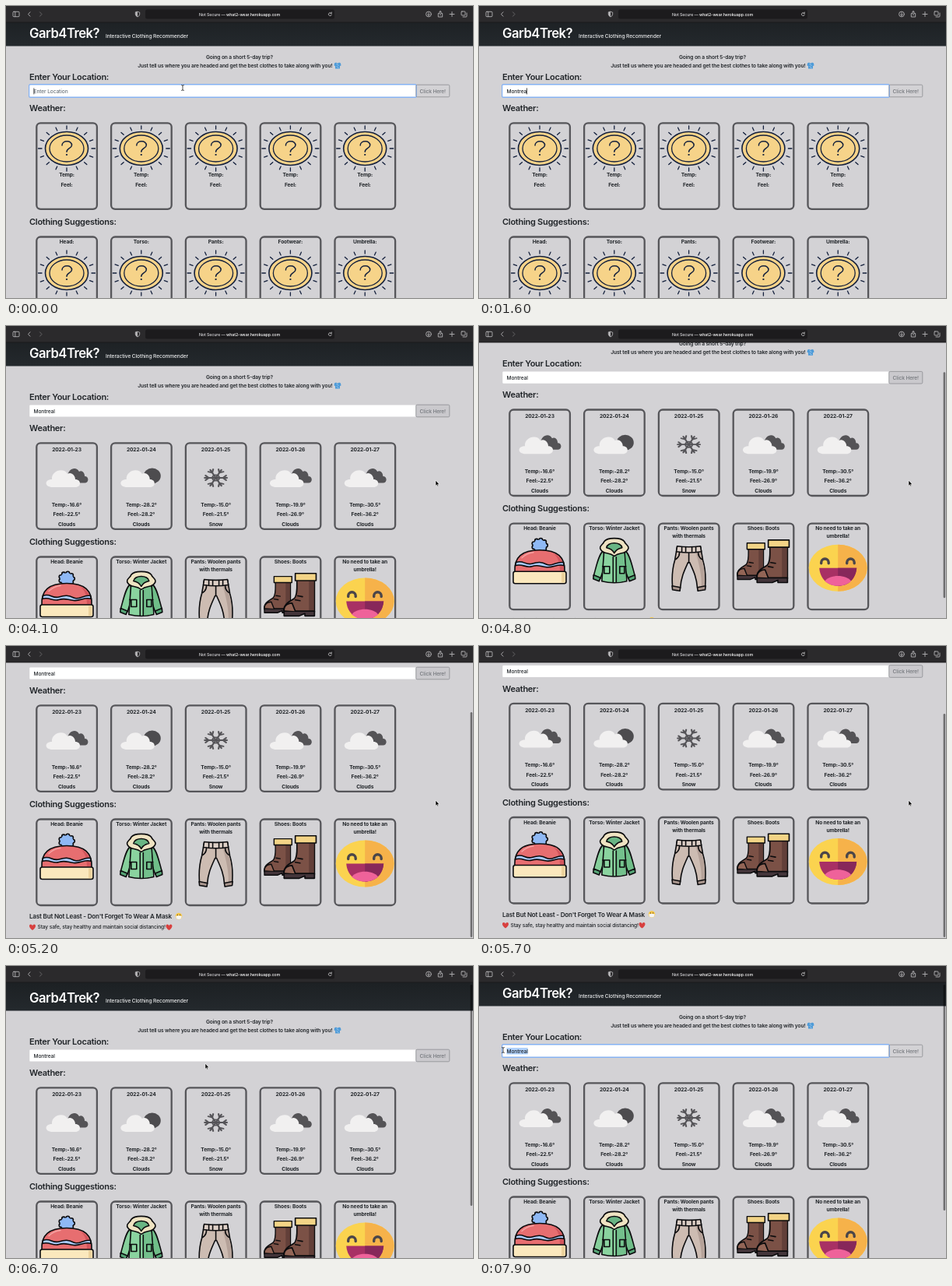
Write an HTML page that moves like this. It is 600 px wide and 375 px high and loops after 8 s.

```html
<!DOCTYPE html>
<html lang="en">
<head>
<meta charset="utf-8">
<title>Clothing Recommender</title>
<style>
html, body { margin: 0; width: 100%; height: 100%; overflow: hidden; background: #d3d2d5; }
svg { display: block; width: 600px; height: 375px; }
text { font: 500 6.67px Inter, "Open Sans", sans-serif; letter-spacing: -.02em; fill: #212529; white-space: pre; }
.mid { text-anchor: middle; }
.med { font-weight: 600; }
.bold { font-weight: 700; text-anchor: middle; }
.head { font-size: 11px; font-weight: 600; letter-spacing: -.025em; }
.line { fill: none; stroke-linecap: round; stroke-linejoin: round; }
.ink { stroke: #0b0b0d; stroke-width: 1.6; stroke-linejoin: round; stroke-linecap: round; }
</style>
</head>
<body>
<svg id="stage" viewBox="0 0 600 375"></svg>
<script>
const text = (x, y, s, cls = '', extra = '') => `<text x="${x}" y="${y}" class="${cls}" ${extra}>${s}</text>`;
const path = (d, fill = 'none', cls = 'ink') => `<path d="${d}" fill="${fill}" class="${cls}"/>`;
const ellipse = (x, y, rx, ry, fill, extra = '') =>
  `<ellipse cx="${x}" cy="${y}" rx="${rx}" ry="${ry}" fill="${fill}" ${extra}/>`;
const at = (x, y, s, scale = 1) => `<g transform="translate(${x} ${y}) scale(${scale})">${s}</g>`;
const range = n => [...Array(n).keys()];
const columns = range(5).map(i => 78 + i * 95.8);

// Placeholder icon: a sun-like coin with a question mark
const rays = range(16).map(i => {
  const a = i * Math.PI / 8, c = Math.cos(a), s = Math.sin(a);
  return `M${c * 32} ${s * 25}L${c * 36.5} ${s * 29}`;
}).join('');
const coin = `<g class="line" stroke="#14203c">
  <path d="${rays}" stroke-width="1.3"/>
  ${ellipse(0, 0, 27.5, 21.5, '#f6d389', 'stroke-width="1.6"')}
  ${ellipse(0, 0, 22, 17, '#f6d389', 'stroke-width="1.3"')}
  <path d="M-6 -4C-6 -11 7 -11 6.5 -4C6.3 0 0 -.5 0 4.2" stroke-width="1.5"/>
  ${ellipse(0, 8, 1.2, 1, '#14203c', 'stroke="none"')}</g>`;

// Weather icons
const cloudShape = 'M-17 10C-28 10 -28 0 -18 0C-19 -11 -3 -16 2 -7C7 -10 12 -5 12 0C20 0 20 10 12 10Z';
const whiteCloud = at(-1, 2, path(cloudShape, '#f1f0f0', ''));
const cloudy = at(14.5, -2, `<g transform="scale(.72 .85)">${path(cloudShape, '#545356', '')}</g>`) + whiteCloud;
const moonCloud = ellipse(14, -2.5, 11, 10, '#4d4c4f') + whiteCloud;
const snow = '<g class="line" stroke="#555458" stroke-width="1.9" transform="scale(1.15 .95)">' + range(6).map(i =>
  `<path transform="rotate(${i * 60 + 30})" d="M0 0V-12.5M-3.2 -11.5L0 -8L3.2 -11.5"/>`).join('') +
  ellipse(0, 0, 3.8, 3.8, 'none') + '</g>';

// Clothing icons
const beanie =
  range(9).map(i => `<circle cx="${8 * Math.cos(i * .698)}" cy="${-19 + 7 * Math.sin(i * .698)}" r="2.3" fill="#8fb9f5" class="ink"/>`).join('') +
  ellipse(0, -19, 8.3, 7.3, '#8fb9f5') +
  path('M-32 15C-33 -4 -23 -13 0 -13S33 -4 32 15Z', '#e76e70') +
  path('M17 -9C28 -4 31 4 31 14H26C26 4 24 -4 17 -9Z', '#d2555c', '') +
  path('M-30.5 3C-22 -1 -18 7 -10 4.5S2 2 9 5.5S22 1 30.5 3L31.5 7C23 4 18 10 9 9S-2 5.5 -10 8S-22 4 -31.5 7Z', '#a9cbfb') +
  path('M-23 -3Q-17 -9 -8 -10', 'none', 'line" stroke="#f4a3a2" stroke-width="1.5') +
  `<rect x="-34" y="14.5" width="68" height="15.5" rx="2.5" fill="#fbe8bd" class="ink"/>` +
  path('M28 16H32.5V28.5H28Z', '#ecd29d', '');
const jacket =
  path('M-14 -12C-20 -8 -23 8 -26.5 20L-18 24L-11 4Z', '#86cf9b') +
  path('M14 -12C20 -8 23 8 26.5 20L18 24L11 4Z', '#6fbd88') +
  path('M-26.5 19L-18 22.5L-19.5 27L-27 24Z', '#55a375') +
  path('M26.5 19L18 22.5L19.5 27L27 24Z', '#55a375') +
  path('M-13 -13H13L16 27Q0 31 -16 27Z', '#8ad39f') +
  path('M3 -12H12L15 26Q9 28 3 28Z', '#73c08c', '') +
  path('M-17 -13C-21 -18 -14 -20 -13 -24C-9 -29.5 9 -29.5 13 -24C14 -20 21 -18 17 -13C13 -7 7 -11 0 -5C-7 -11 -13 -7 -17 -13Z', '#efe3c2') +
  path('M-10 -16C-9 -24 9 -24 10 -16C5 -15 2 -13 0 -9C-2 -13 -5 -15 -10 -16Z', '#69b584') +
  path('M-1.5 -4V28M2.5 -4V28M-15 8H-6M15 8H7M-13 8V17H-6V8M13 8V17H7V8');
const pants =
  path('M-15 -17H15L18 0C21 10 22 22 21 34L11 36C10 22 6 14 1 3H-1C-6 14 -10 22 -11 36L-21 34C-22 22 -21 10 -18 0Z', '#cdbcb2') +
  path('M9 -10H15L17 0C20 10 21 22 20 33L16 34C17 20 13 5 9 -10Z', '#b5a299', '') +
  path('M-15 -18Q0 -16 15 -18L16 -11Q0 -8.5 -16 -11Z', '#ddcfc6') +
  path('M-21.5 33L-11 35L-11.5 39.5L-21 38ZM21.5 33L11 35L11.5 39.5L21 38Z', '#a8958d') +
  path('M0 -9V3M-12 -10Q-12 -4 -17 -1M12 -10Q12 -4 17 -1M-9 -17V-11M-4 -17V-11M4 -17V-11M9 -17V-11');
const boot =
  path('M-6 -18H16V22H-22C-24 12 -14 9 -9 5C-5 0 -6 -9 -6 -18Z', '#7b5146') +
  path('M9 -17H15V21H9Z', '#623f39', '') +
  path('M-22 21H16V27H4V24L-3 27H-22Z', '#43353a') +
  path('M-22 20C-22 13 -16 11 -12 11L-8 21', '#936556') +
  path('M-8 -26H18V-17H-8Z', '#f3d486') +
  path('M-5 2L1 3M-8 7L-2 8');
const boots = at(-14, 1, boot, .88) + at(14.5, 1, boot, 1.03);
const smile =
  ellipse(0, 0, 37.5, 30, '#fbd34f') +
  path('M0 -30A37.5 30 0 0 1 0 30Z', '#f6b24a', '') +
  path('M-21.5 -6V-7A4.7 4.7 0 0 1 -12 -7V-6M11.5 -6V-7A4.7 4.7 0 0 1 21 -7V-6', 'none', 'line" stroke="#4b4649" stroke-width="3.4') +
  path('M-24 0H24C23 14 13 23 0 23S-23 14 -24 0Z', '#a83064', '') +
  path('M0 0H24C23 14 13 23 0 23Z', '#87275a', '') +
  path('M-17 17C-11 8 11 8 17 17Q10 23 0 23T-17 17Z', '#ef629a', '');

// Small inline pictographs
const shirt = path('M-2 -4L-4 -3L-4.5 0L-3 .5V4H3V.5L4.5 0L4 -3L2 -4Q0 -2 -2 -4Z', '#4f9bd8', '') +
  path('M-1 -2L1 0M-1 1L1 3', 'none', 'line" stroke="#cde7fa" stroke-width=".7');
const maskFace = `<circle r="4.3" fill="#f7c846"/>` + path('M-3.8 0Q0 -1.5 3.8 0L3 3Q0 5 -3 3Z', '#f4f5f8', '') +
  `<circle cx="-1.6" cy="-1.6" r=".6" fill="#553b20"/><circle cx="1.6" cy="-1.6" r=".6" fill="#553b20"/>`;
const heart = path('M0 4C-6 0 -4 -4 -2 -3.5Q0 -3 0 -1.5Q0 -3 2 -3.5C4 -4 6 0 0 4Z', '#d8403f', '');

// Cards
const frames = y => columns.map(x =>
  `<rect x="${x - 38.7}" y="${y}" width="77.6" height="110.5" rx="5" fill="none" stroke="#56565a" stroke-width="2.3"/>`).join('');
const unknown = columns.map((x, i) =>
  at(x, 183, coin) + text(x, 219.3, 'Temp:', 'bold') + text(x, 231.8, 'Feel:', 'bold') +
  text(x, 305, ['Head:', 'Torso:', 'Pants:', 'Footwear:', 'Umbrella:'][i], 'bold') + at(x, 343, coin)).join('');
const forecast = [
  [cloudy, '-16.6', '-22.5', 'Clouds'], [moonCloud, '-28.2', '-28.2', 'Clouds'], [snow, '-15.0', '-21.5', 'Snow'],
  [cloudy, '-19.9', '-26.9', 'Clouds'], [cloudy, '-30.5', '-36.2', 'Clouds']];
const outfit = [
  [beanie, 'Head: Beanie'], [jacket, 'Torso: Winter Jacket'], [pants, 'Pants: Woolen pants', 'with thermals'],
  [boots, 'Shoes: Boots'], [smile, 'No need to take an', 'umbrella!']];
const results = columns.map((x, i) => {
  const [icon, temp, feel, sky] = forecast[i], [wear, line1, line2 = ''] = outfit[i];
  return text(x, 161, '2022-01-' + (23 + i), 'bold') + at(x, 195, icon) +
    text(x, 231.5, `Temp:${temp}°`, 'bold') + text(x, 244, `Feel:${feel}°`, 'bold') + text(x, 256.5, sky, 'bold') +
    text(x, 305, line1, 'bold') + text(x, 315, line2, 'bold') + at(x, i == 4 ? 353.5 : 343.5, wear);
}).join('');

const page = `
  <rect y="-60" width="600" height="111.5" fill="url(#dark)"/>
  ${text(30, 41, 'Garb4Trek?', 'med', 'style="font-size:16.67px;letter-spacing:-.03em;fill:#fff"')}
  ${text(128, 41.3, 'Interactive Clothing Recommender', '', 'style="fill:#e8e9ea"')}
  ${text(300, 68, 'Going on a short 5-day trip?', 'mid med')}
  ${text(169.3, 79.2, 'Just tell us where you are headed and get the best clothes to take along with you!', 'med')}
  ${at(426, 76.5, shirt)}
  ${text(30, 95.3, 'Enter Your Location:', 'head')}
  <rect id="glow" x="29" y="100" width="499" height="18" rx="2.5" fill="#86b2f2"/>
  <rect x="30.3" y="101.4" width="496.4" height="15.2" rx="1.2" fill="#fff"/>
  <rect id="picked" y="105" height="8.5" fill="#b0d1fb"/>
  ${text(35.5, 111.6, '', '', 'id="typed"')}
  <rect id="caret" y="105.4" width=".8" height="8" fill="#222"/>
  <rect id="button" x="526.8" y="101.2" width="43" height="15.6" rx="1.5" stroke="#8b8c91" stroke-width=".8"/>
  ${text(548.3, 111.6, 'Click Here!', 'mid', 'id="label"')}
  ${text(30, 135.2, 'Weather:', 'head')}${frames(150.3)}
  ${text(30, 281.3, 'Clothing Suggestions:', 'head')}${frames(296.5)}
  <g id="unknown">${unknown}</g><g id="results">${results}</g>
  ${text(30, 424, 'Last But Not Least - Don\'t Forget To Wear A Mask', 'med', 'style="font-size:8.1px;letter-spacing:-.025em"')}
  ${at(222, 421, maskFace)}${at(34, 435, heart)}
  ${text(40.5, 437.2, 'Stay safe, stay healthy and maintain social distancing!')}${at(209.5, 435, heart)}`;

const toolbar = `
  <rect width="600" height="21.2" fill="#2b2a2c"/><rect y="20.7" width="600" height=".6" fill="#111"/>
  <rect x="179" y="4.6" width="243" height="12" rx="2.5" fill="#1c1b1d"/>
  <g class="line" stroke="#b4b3b5" stroke-width=".9">
    <rect x="9" y="7.3" width="8" height="6.4" rx="1"/><path d="M11.8 7.3V13.7M31 7.8L28.5 10.5L31 13.2"/>
    <path d="M43.5 7.8L46 10.5L43.5 13.2" stroke="#6c6b6e"/>
    <path d="M169 7.3L171.7 8.2V10.5Q171.7 12.7 169 14Q166.3 12.7 166.3 10.5V8.2Z"/>
    <path d="M169 7.3V14Q166.3 12.7 166.3 10.5V8.2Z" fill="#b4b3b5" stroke="none"/>
    <path d="M418 9.4A2 2 0 1 0 418.3 11.2M418.3 8V9.6H416.7"/>
    <circle cx="543" cy="10.5" r="3.4"/><path d="M543 8.7V12.2M541.6 11L543 12.3L544.4 11"/>
    <path d="M556.6 9.5H555.3V14H560.7V9.5H559.4M558 11.7V6.6M556.4 8.1L558 6.6L559.6 8.1M573 7.5V13.5M570 10.5H576"/>
    <rect x="585" y="7" width="5" height="5" rx=".8"/><path d="M587 14H591A1 1 0 0 0 592 13V9"/>
  </g>
  <text x="300" y="12.5" class="mid" style="font-size:5.3px;fill:#fff"><tspan fill="#dddcdf">Not Secure — </tspan>what2-wear.herokuapp.com</text>`;

const cursors = {
  beam: path('M-1.4 -3.5Q0 -3.5 0 -2.5Q0 -3.5 1.4 -3.5M0 -2.5V2.5M-1.4 3.5Q0 3.5 0 2.5Q0 3.5 1.4 3.5', 'none', 'line" stroke="#222" stroke-width=".8'),
  arrow: path('M0 -2.5V4.2L1.5 2.8L2.5 5L3.5 4.5L2.6 2.4H4.6Z', '#000', 'line" stroke="#fff" stroke-width=".5" style="fill:#000'),
  hand: path('M-1 -3.4Q0 -4.4 .6 -3.3V-.8L3.2 0V2.6L2 4.5H-1L-3 1.3Q-2.6 .2 -1 1.3Z', '#000', 'line" stroke="#fff" stroke-width=".6" style="fill:#111')
};

document.getElementById('stage').innerHTML = `
  <defs><linearGradient id="dark" x2="0" y2="1"><stop offset=".7" stop-color="#1d2124"/><stop offset="1" stop-color="#24292d"/></linearGradient></defs>
  <rect width="600" height="375" fill="#d3d2d5"/>
  <g id="page">${page}</g>
  <rect id="thumb" x="596.6" width="2.6" rx="1.3" fill="#000" opacity=".48"/>
  ${toolbar}
  <g id="cursor">${Object.keys(cursors).map(k => `<g id="${k}">${cursors[k]}</g>`).join('')}</g>`;

const el = id => document.getElementById(id);
const set = (id, attrs) => { for (const k in attrs) el(id).setAttribute(k, attrs[k]); };
const show = (id, on) => { el(id).style.display = on ? '' : 'none'; };

// Linear interpolation through [time, ...values] keys
function tween(keys, t) {
  const i = keys.findIndex(k => k[0] > t);
  if (i < 0) return keys[keys.length - 1].slice(1);
  if (i === 0) return keys[0].slice(1);
  const a = keys[i - 1], b = keys[i], p = (t - a[0]) / (b[0] - a[0]);
  return a.slice(1).map((v, j) => v + (b[j + 1] - v) * p);
}
const scrollKeys = [[4500, 0], [4600, 10], [4700, 26], [4800, 42.8], [4900, 56], [5000, 66], [5200, 74], [5300, 74],
  [5500, 80], [5600, 79], [5800, 74], [6300, 74], [6400, 53.5], [6600, 4], [6700, -6], [6800, -7], [7000, -2], [7200, 0]];
const cursorKeys = [[2600, 227, 105], [3000, 470, 113], [3200, 578, 119], [3400, 560, 112], [3900, 560, 112], [4100, 552, 201],
  [6400, 552, 201], [6700, 256, 128], [7000, 120, 110], [7200, 74, 104], [7400, 65, 105], [7500, 63, 108], [7900, 31, 108]];
const typing = [[700, 1], [1000, 3], [1300, 5], [1400, 6], [1600, 7], [2300, 8]];

function draw(t) {
  const [scroll] = tween(scrollKeys, t), [x, y] = tween(cursorKeys, t);
  set('page', { transform: `translate(0 ${-scroll})` });

  const typed = 'Montreal'.slice(0, typing.filter(k => k[0] <= t).reduce((n, k) => k[1], 0));
  el('typed').textContent = typed || 'Enter Location';
  el('typed').style.fill = typed ? '#212529' : '#6c757d';
  const end = 35.5 + (typed ? el('typed').getComputedTextLength() : 0);
  set('caret', { x: end });
  show('caret', t < 200 || t >= 700 && t < 3700);
  const focused = t < 3700 || t >= 7600;
  show('glow', focused);

  const from = Math.max(35.5, Math.min(x, end));
  set('picked', { x: from, width: end - from });
  show('picked', t >= 7600);

  const hover = t > 3000 && t < 4000 && x > 527 && x < 570;
  set('button', { fill: hover ? '#70757b' : focused ? 'none' : '#cac9cd' });
  el('label').style.fill = hover ? '#fff' : '#74777c';

  show('unknown', t < 3700);
  show('results', t >= 3700);

  const top = 24 + Math.max(scroll, 0) * 61 / 74;
  set('thumb', { y: top, height: Math.min(290 + Math.min(scroll, 0), 374 - top) });
  show('thumb', t >= 4600);

  const shape = hover ? 'hand' : t < 2800 || t >= 7200 ? 'beam' : 'arrow';
  for (const k in cursors) show(k, k === shape);
  set('cursor', { transform: `translate(${x} ${y})` });
  show('cursor', t < 700 || t >= 2700);
}

// The picture advances ten times a second
function loop() {
  draw(Math.floor(performance.now() % 8000 / 100) * 100);
  requestAnimationFrame(loop);
}
loop();
</script>
</body>
</html>
```
